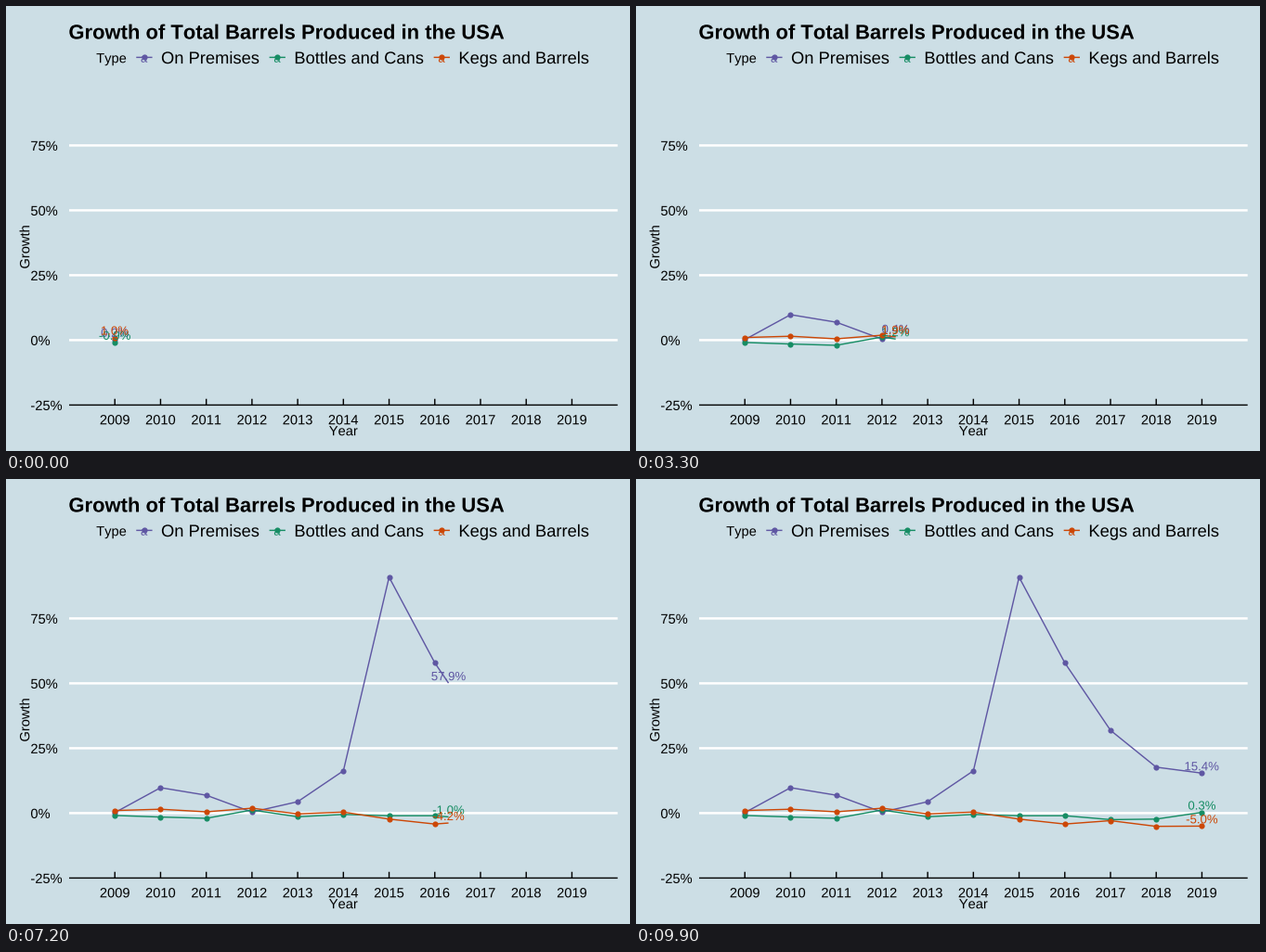
Recreate the animation shown at these times as a matplotlib script. Size 672x480 px, loop 10 s.

```python
import matplotlib.pyplot as plt
import numpy as np
from matplotlib.animation import FuncAnimation
from matplotlib.patches import PathPatch
from matplotlib.textpath import TextPath
from matplotlib.transforms import Affine2D

plt.rcParams["text.kerning_factor"] = 10  # plain advances, no kerning
plt.rcParams["path.snap"] = False

W, H, DPI = 672, 480, 96
FRAMES, INTERVAL = 100, 100
PX = 72 / DPI

BACK = "#ccdee5"
LEFT, RIGHT, BOTTOM = 68, 658.67, 430.4
YEAR_W = (RIGHT - LEFT) / 12
UNIT = 2.8  # pixels per percentage point
LINE, DOT = 1.42 * PX, 6.2 * PX
LABEL_SIZE, LABEL_LIFT = 13.2, 3

SERIES = [
    ("On Premises", "#5f57a3", 167.0,
     [0.2, 9.8, 6.9, 0.4, 4.4, 16.3, 90.9, 57.9, 31.9, 17.7, 15.4]),
    ("Bottles and Cans", "#168d64", 310.35,
     [-0.9, -1.5, -2.0, 1.2, -1.4, -0.5, -1.0, -1.0, -2.5, -2.3, 0.3]),
    ("Kegs and Barrels", "#cc4706", 487.4,
     [1.0, 1.5, 0.5, 1.9, -0.3, 0.4, -2.3, -4.2, -2.9, -5.1, -5.0]),
]
YEARS = np.arange(11)
# Every year is reached on a whole frame.
KEYS = np.round(YEARS * (FRAMES - 1) / 10)


def px(year):
    return LEFT + (year + 1) * YEAR_W


def py(value):
    return BOTTOM - (np.asarray(value) + 25) * UNIT


fig = plt.figure(figsize=(W / DPI, H / DPI), dpi=DPI, facecolor=BACK)
ax = fig.add_axes([0, 0, 1, 1])
ax.set(xlim=(0, W), ylim=(H, 0))
ax.axis("off")


def glyphs(s, size, weight="normal", center=False):
    path = TextPath((0, 0), s, size=size,
                    prop={"family": "Liberation Sans", "weight": weight})
    if center:
        box = path.get_extents()
        path = path.transformed(Affine2D().translate(-(box.x0 + box.x1) / 2, 0))
    return path


def place(patch, x, y, angle=0):
    move = Affine2D().rotate_deg(angle).scale(1, -1).translate(x, y)
    patch.set_transform(move + ax.transData)


def text(s, x, y, size=14.67, color="black", weight="normal",
         center=False, angle=0, z=3):
    patch = PathPatch(glyphs(s, size, weight, center), fc=color, lw=0, zorder=z)
    ax.add_artist(patch)
    place(patch, x, y, angle)
    return patch


def stroke(xs, ys, color, width=LINE, z=2):
    return ax.plot(xs, ys, color=color, lw=width, zorder=z,
                   solid_capstyle="butt", solid_joinstyle="round")[0]


def dots(xs, ys, color, z=3):
    return ax.plot(xs, ys, "o", color=color, ms=DOT, mew=0, zorder=z)[0]


# Grid and axes
for value in (0, 25, 50, 75):
    stroke([LEFT, RIGHT], [py(value)] * 2, "white", 2.49 * PX, 1)
for value in (-25, 0, 25, 50, 75):
    text(f"{value}%", 26.4, py(value) + 5.5)
stroke([LEFT, RIGHT], [BOTTOM] * 2, "black")
for year in YEARS:
    stroke([px(year)] * 2, [BOTTOM - 6.67, BOTTOM], "black")
    text(str(2009 + year), px(year), 451.3, center=True)
text("Year", (LEFT + RIGHT) / 2, 463.2, center=True)
text("Growth", 25.2, 260, center=True, angle=90)

# Title and legend
text("Growth of Total Barrels Produced in the USA", 67.4, 35.5, 22, weight="bold")
text("Type", 97.2, 61.2)
for name, color, x, _ in SERIES:
    key = x - 18.1
    stroke([key - 8.64, key + 8.64], [55.4] * 2, color)
    dots([key], [55.4], color)
    text("a", key, 60.7, LABEL_SIZE, color, center=True, z=4)
    text(name, x, 62.1, 18.33)

# Moving parts
tracks = []
for i, (_, color, _, values) in enumerate(SERIES):
    z = i / 10
    labels = [glyphs(f"{v:.1f}%", LABEL_SIZE, center=True) for v in values]
    tracks.append((
        np.array(values), labels,
        stroke([], [], color, z=5 + z),
        dots([], [], color, 6 + z),
        text("0", 0, 0, LABEL_SIZE, color, z=7 + z),
    ))


def update(frame):
    t = np.interp(frame, KEYS, YEARS)
    passed = int(t + 1e-9) + 1
    nearest = int(t + 0.5 + 1e-9)
    for values, labels, line, points, label in tracks:
        head = np.interp(t, YEARS, values)
        xs, ys = px(YEARS[:passed]), py(values[:passed])
        line.set_data(np.append(xs, px(t)), np.append(ys, py(head)))
        points.set_data(xs, ys)
        label.set_path(labels[nearest]) if hasattr(label, "set_path") else None
        place(label, px(t), py(head) - LABEL_LIFT)
    return [artist for track in tracks for artist in track[2:]]


anim = FuncAnimation(fig, update, frames=FRAMES, interval=INTERVAL,
                     repeat=True, repeat_delay=0)
plt.show()
```
